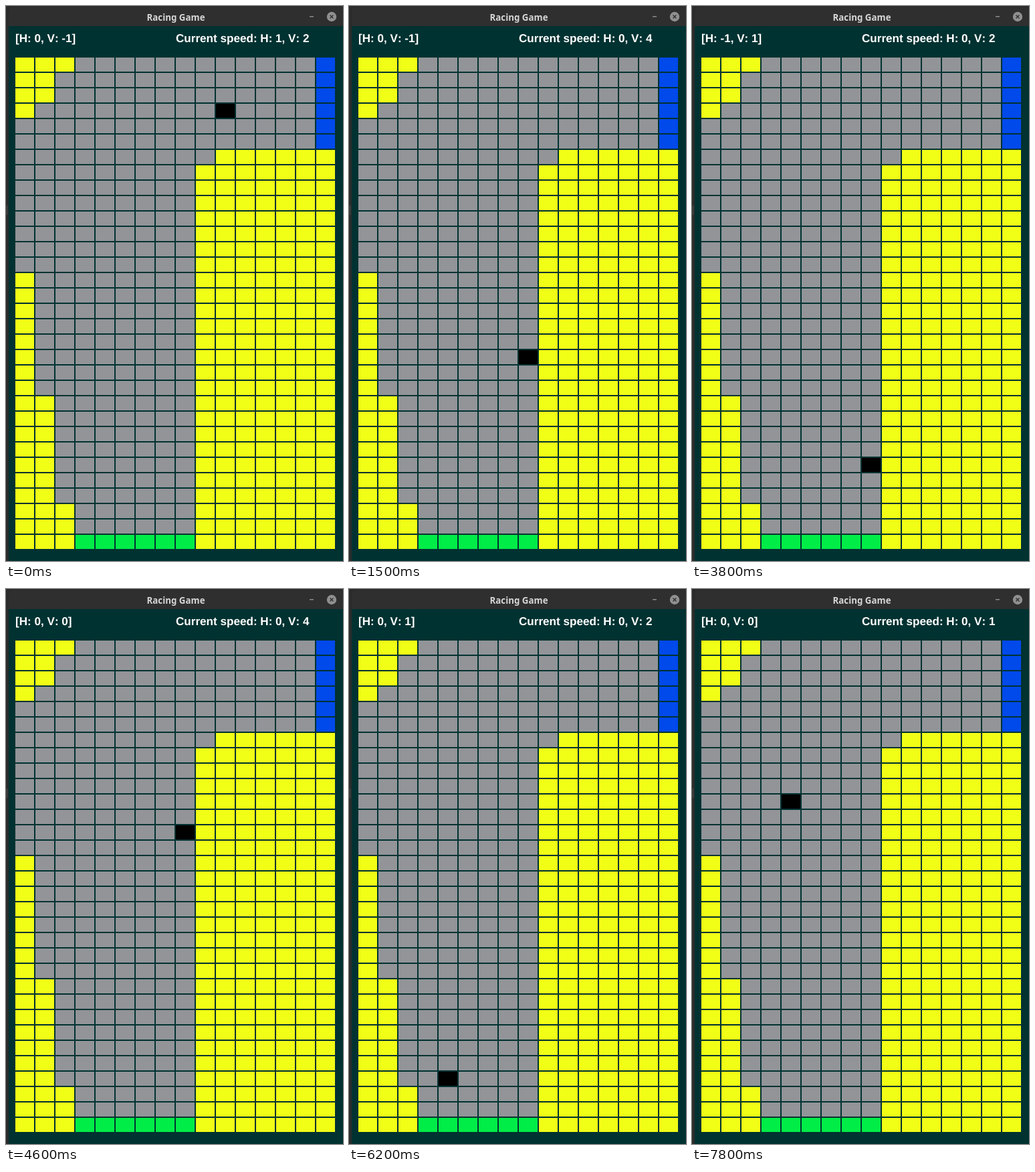
These frames come from a looping animation (504 px wide and 829 px high, 8000 ms). An HTML page:

```html
<!DOCTYPE html>
<html lang="en">
<head>
<meta charset="utf-8">
<title>Racing Game</title>
<style>
  html, body { margin: 0; width: 100%; height: 100%; overflow: hidden; background: #003231; }
  svg { display: block; }
  text { white-space: pre; }
  .title { font: bold 13.33px "Noto Sans", "Open Sans", sans-serif; fill: #d6d6d6; text-anchor: middle; }
  .hud { font: bold 17.1px "Liberation Sans", Arial, sans-serif; fill: #fff; font-kerning: none; text-rendering: geometricPrecision; }
</style>
</head>
<body>
<svg id="stage" width="504" height="829" viewBox="0 0 504 829">
  <rect width="504" height="829" fill="#2b2b2b"/>
  <rect y="298" width="3" height="14" fill="#3a3a3a"/>
  <path d="M4 30V8q0-6 6-6H504V30Z" fill="#2f2f2f"/>
  <rect x="4" y="30" width="500" height="799" fill="#003231"/>
  <text class="title" x="254" y="22">Racing Game</text>
  <rect x="454" y="15" width="6" height="1.5" fill="#8c8c8c"/>
  <circle cx="487" cy="16" r="7.2" fill="#909090"/>
  <path d="M484.5 13.5l5 5m0-5l-5 5" stroke="#2f2f2f" stroke-width="1.4"/>
  <text class="hud" id="action" x="14" y="54"></text>
  <text class="hud" id="speed" x="254" y="54"></text>
  <g id="track"></g>
</svg>
<script>
const COLS = 16, ROWS = 32, LOOP = 8000;
const COLORS = { wall: '#f1fe16', road: '#929498', start: '#00ed47', finish: '#0049eb' };
const byId = id => document.getElementById(id);

function addCell(col, row, fill) {
  const rect = document.createElementNS('http://www.w3.org/2000/svg', 'rect');
  const attrs = { x: 14 + col * 30, y: 77 + row * 23, width: 28, height: 21, fill };
  for (const name in attrs) rect.setAttribute(name, attrs[name]);
  byId('track').append(rect);
  return rect;
}

function leftWall(row) {
  if (row < 4) return [3, 2, 2, 1][row];
  return row < 14 ? 0 : row < 22 ? 1 : row < 29 ? 2 : 3;
}

function cellKind(col, row) {
  const rightWall = row < 6 ? COLS : row === 6 ? 10 : 9;
  if (col < leftWall(row) || col >= rightWall) return 'wall';
  if (row === ROWS - 1) return 'start';
  return col === COLS - 1 ? 'finish' : 'road';
}

for (let row = 0; row < ROWS; row++)
  for (let col = 0; col < COLS; col++) addCell(col, row, COLORS[cellKind(col, row)]);

// Each action changes the speed, then the car moves by that speed.
const clampSpeed = v => Math.max(0, Math.min(4, v));
function drive(col, row, h, v, actions) {
  return actions.map(([dh, dv]) => {
    const state = { col, row, h, v, dh, dv };
    h = clampSpeed(h + dh);
    v = clampSpeed(v + dv);
    col += h;
    row -= v;
    return state;
  });
}

const finishTurn = [[0, -1], [1, -1], [1, 0]];
const fullLap = [[0, 1], [0, 1], [0, 0], [-1, 1], [0, 1], [0, -1], [0, 1], [0, 0], [1, -1], [0, -1], ...finishTurn];
const slowLap = [[-1, 1], [0, 1], [0, 1], [0, 0], [0, 0], [0, -1], [-1, 0], [0, 0], [0, 0], [0, -1], [0, 0]];
const states = [
  ...drive(10, 3, 1, 2, finishTurn),
  ...drive(8, 31, 0, 0, fullLap),
  ...drive(8, 31, 0, 0, fullLap),
  ...drive(4, 31, 0, 0, slowLap),
];

const car = addCell(0, 0, '#000');
let shown = -1;

function draw(now) {
  const t = now % LOOP;
  // Steps last 200 ms; the first is half as long and the one at 3300 ms lasts 300 ms.
  const index = Math.floor((t + (t < 3500 ? 100 : 0)) / 200);
  if (index !== shown) {
    shown = index;
    const s = states[index];
    car.setAttribute('x', 14 + s.col * 30);
    car.setAttribute('y', 77 + s.row * 23);
    byId('action').textContent = `[H: ${s.dh}, V: ${s.dv}]`;
    byId('speed').textContent = `Current speed: H: ${s.h}, V: ${s.v}`;
  }
}

const begin = performance.now();
function tick() {
  draw(performance.now() - begin);
  requestAnimationFrame(tick);
}
tick();
</script>
</body>
</html>
```
